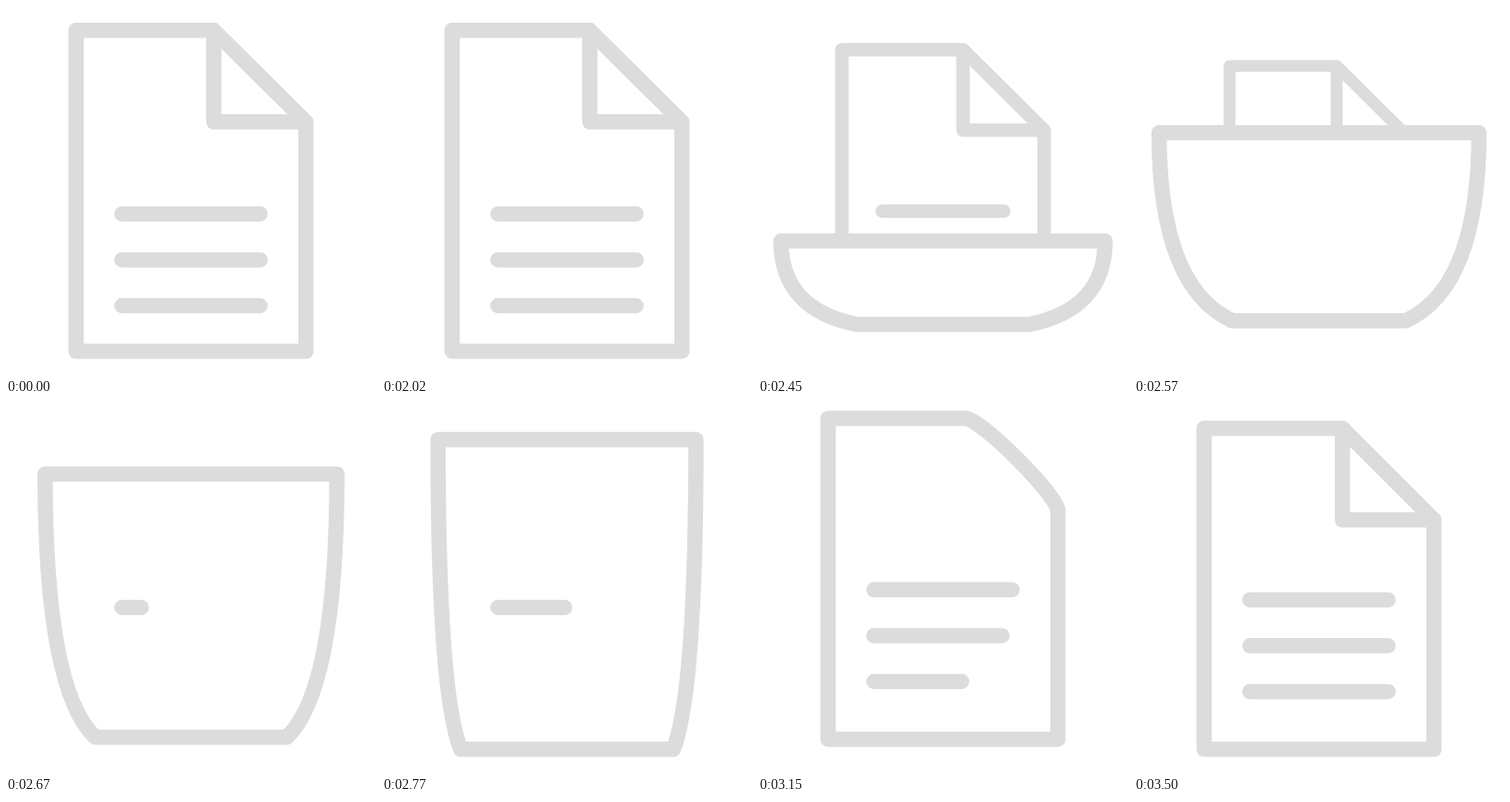
Write an HTML page that moves like this. It is 400 by 400 pixels and loops after 3.52 s.

```html
<!DOCTYPE html>
<html lang="en">
<head>
<meta charset="utf-8">
<title>Paper refresh</title>
<style>
  html, body { margin: 0; width: 100%; height: 100%; overflow: hidden; background: #fff; }
  svg { display: block; width: 100vw; height: 100vh; }
  path {
    fill: none; stroke: #dcdcdc; stroke-width: 16.5;
    stroke-linecap: round; stroke-linejoin: round;
  }
  #sheet { fill: #fff; }
</style>
</head>
<body>
<svg viewBox="0 0 400 400">
  <clipPath id="above"><rect id="cover" width="400" height="400"/></clipPath>
  <g clip-path="url(#above)">
    <g id="old">
      <path d="M75.7 26.3H224.6L324.3 125.3V373.3H75.7Z"/>
      <path d="M224.6 26.3V125.3H324.3"/>
      <path d="M125.3 224.8H274.7M125.3 274.4H274.7M125.3 324H274.7"/>
    </g>
  </g>
  <g id="fresh">
    <path id="sheet"/>
    <path id="fold"/>
    <path id="bars"/>
  </g>
</svg>
<script>
const LOOP = 3520, START = 2000, STEP = 25;
const OPEN = 2075, PEAK = 3075, END = 3500;
const $ = id => document.getElementById(id);

const clamp = x => Math.min(1, Math.max(0, x));
const part = (t, from, to) => clamp((t - from) / (to - from));
const smooth = x => x * x * (3 - 2 * x);
const bump = (t, mid, half) => smooth(clamp(1 - Math.abs(t - mid) / half));

// Cubic in-out whose turning point is at m
const swing = (x, m) => x < m ? x ** 3 / m ** 2 : 1 - (1 - x) ** 3 / (1 - m) ** 2;

// The new page leaps up, then sinks back
const leap = t => smooth(part(t, 2775, PEAK));
const sink = t => Math.sin(part(t, PEAK, END) * Math.PI / 2);

const sheetTop = t => 373.3 - 362 * swing(part(t, OPEN, PEAK), .4) + 15 * sink(t);
const sheetBottom = t => 373.3 + 7 * bump(t, 2175, 100) - 37 * bump(t, 2525, 250)
  - 15 * (leap(t) - sink(t));

function drawSheet(t) {
  const top = sheetTop(t), bottom = sheetBottom(t);
  const spread = bump(t, 2500, 425);
  const wide = 124.3 + 53 * spread, base = 124.3 - 33 * spread;
  const left = 200 - wide, right = 200 + wide;
  const belly = top + .82 * (bottom - top);

  // Corner is cut off, bulging at first
  const cut = 99 * smooth(part(t, 2775, 3150));
  const a = .2 * cut, b = a * part(t, 3125, 3225);
  const x = right - cut, y = top + cut;

  $('sheet').setAttribute('d',
    `M${left} ${top}H${x}C${x + a} ${top + b} ${right - b} ${y - a} ${right} ${y}` +
    `Q${right} ${belly} ${200 + base} ${bottom}H${200 - base}` +
    `Q${left} ${belly} ${left} ${top}Z`);

  const flap = smooth(part(t, 3200, 3425)), tip = cut * (1 + flap) / 2;
  $('fold').setAttribute('d', flap > 0
    ? `M${x} ${top}L${right - tip} ${top + tip}L${right} ${y}` : '');
}

function drawBars(t) {
  const y = 220 - 23.3 * leap(t) + 15 * sink(t);
  let d = '';
  for (let i = 0; i < 3; i++) {
    const from = 2640 + 160 * i, p = part(t, from, from + 480);
    if (p > 0) d += `M125.3 ${y + 49.6 * i}h${149.4 * p * (2 - p)}`;
  }
  $('bars').setAttribute('d', d);
}

function render(now) {
  const n = Math.max(0, Math.floor((now % LOOP - START + 5) / STEP));
  const t = START + n * STEP;
  const s = 1 - .222 * part(t, START, 2575 + 125) ** 2.5 * (700 / 575) ** 2.5;
  const shift = 200 * (1 - s);
  $('old').setAttribute('transform', `translate(${shift} ${shift}) scale(${s})`);
  $('old').style.display = t < 2700 ? '' : 'none';
  $('cover').setAttribute('height', t < OPEN ? 400 : sheetTop(t));
  $('fresh').style.display = t < OPEN ? 'none' : '';
  drawSheet(t);
  drawBars(t);
}

const begin = performance.now();
function tick() {
  render(performance.now() - begin);
  requestAnimationFrame(tick);
}
tick();
</script>
</body>
</html>
```
